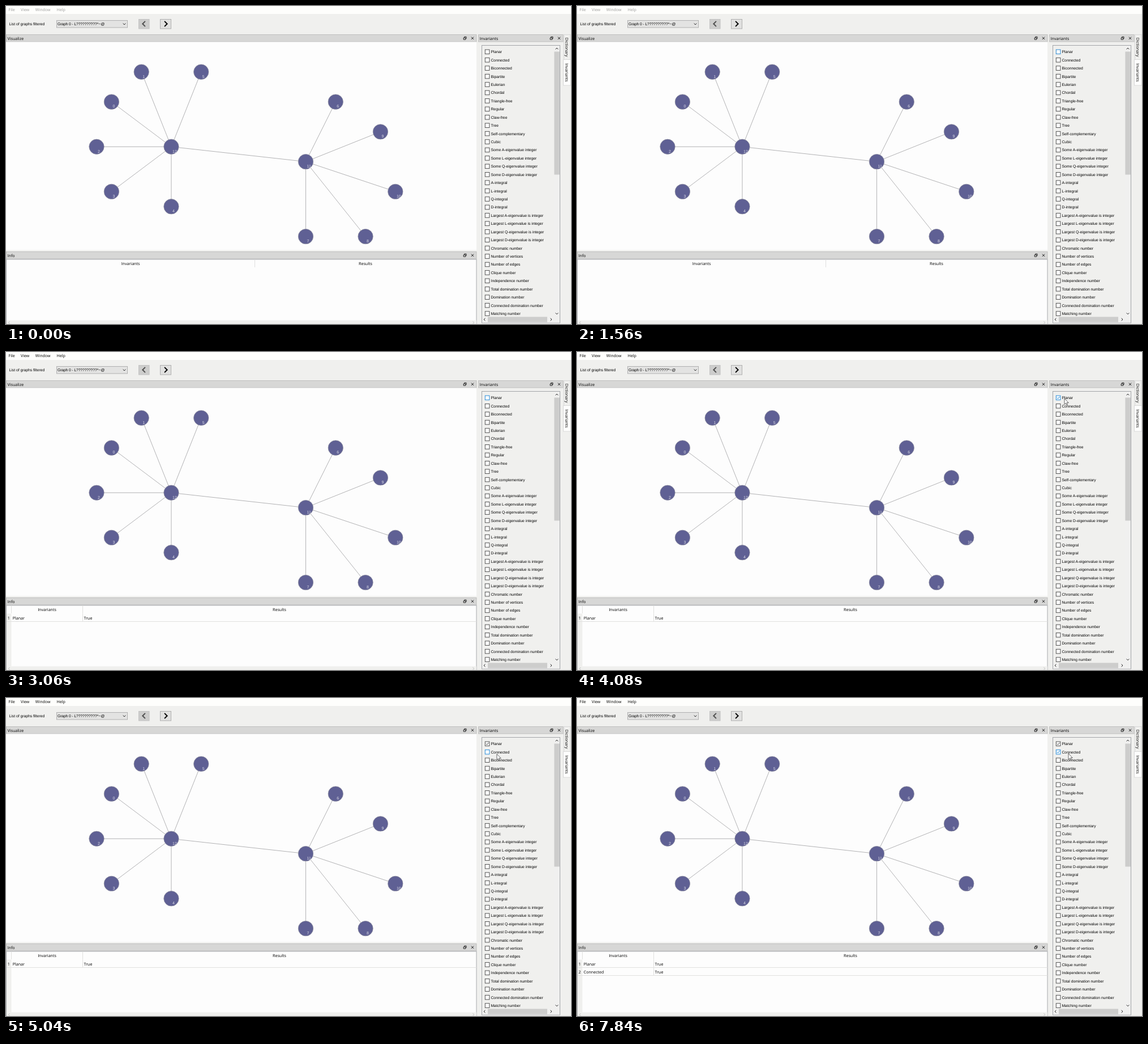
An HTML page that plays this animation: 998x561 px, repeating every 8 s.

```html
<!DOCTYPE html>
<html lang="en">
<head>
<meta charset="utf-8">
<title>Graph invariants</title>
<style>
html, body { margin: 0; width: 100%; height: 100%; overflow: hidden; background: #f0f0ee; }
svg { display: block; }
text { font: 7.1px "Open Sans", "Noto Sans", sans-serif; fill: #000; text-rendering: geometricPrecision; }
.form { font: 6.75px "Liberation Sans", Arial, sans-serif; }
.combo { letter-spacing: -.1px; }
.mid { text-anchor: middle; }
.node { fill: #5f6094; stroke: #8e8e9c; stroke-width: .7; }
.label { font: 7px "Liberation Sans", Arial, sans-serif; fill: #dcdce6; }
.edge { stroke: #b2b2b4; stroke-width: 1; }
.icon { fill: none; stroke: #222; stroke-width: 1; }
.pale { stroke: #bcbcbc; }
.grid { stroke: #e0e0df; }

.box { color: #444; }
.box rect { fill: #fdfdfd; stroke: currentColor; stroke-width: .9; }
.box path { fill: none; stroke: currentColor; stroke-width: 1; opacity: 0; }

/* one loop is 8 s, so 1% is 80 ms */
.menu, .before, .after, .second, .cursor, .box, .box path {
  animation: 8s linear infinite;
}
.menu { animation-name: enable; }
.before { animation-name: hide; }
.after { animation-name: show; }
.second { animation-name: showSecond; }
.cursor { animation-name: move, appear; }
.box0 { animation-name: hover0; }
.box1 { animation-name: hover1; }
.box2 { animation-name: hover2; }
.box0 path { animation-name: check0; }
.box1 path { animation-name: check1; }

@keyframes enable { 0%, 36.24% { fill: #9c9c9c; } 36.25%, 100% { fill: #000; } }
@keyframes hide { 0%, 36.24% { opacity: 1; } 36.25%, 100% { opacity: 0; } }
@keyframes show { 0%, 36.24% { opacity: 0; } 36.25%, 100% { opacity: 1; } }
@keyframes showSecond { 0%, 92.49% { opacity: 0; } 92.5%, 100% { opacity: 1; } }
@keyframes appear { 0%, 38.99% { opacity: 0; } 39%, 100% { opacity: 1; } }
@keyframes hover0 { 0%, 13.75% { color: #444; } 20%, 55% { color: #1583d8; } 62%, 100% { color: #444; } }
@keyframes hover1 {
  0%, 8.75% { color: #444; } 11.25%, 13.5% { color: #1583d8; }
  18.75%, 55% { color: #444; } 60%, 100% { color: #1583d8; }
}
@keyframes hover2 { 0%, 5.5% { color: #444; } 8%, 8.75% { color: #1583d8; } 12%, 100% { color: #444; } }
@keyframes check0 { 0%, 39% { opacity: 0; } 43.75%, 100% { opacity: 1; } }
@keyframes check1 { 0%, 93% { opacity: 0; } 98%, 100% { opacity: 1; } }
@keyframes move {
  0%, 52.5% { transform: translate(861px, 82px); }
  56.5% { transform: translate(873px, 96px); }
  61% { transform: translate(867px, 101px); }
  63%, 82.5% { transform: translate(867px, 98.7px); }
  84%, 86% { transform: translate(868px, 99.2px); }
  87.5%, 100% { transform: translate(868px, 98px); }
}
</style>
</head>
<body>
<svg id="stage" width="998" height="561" viewBox="0 0 998 561"></svg>
<script>
const rect = (x, y, w, h, fill, stroke) =>
  `<rect x="${x}" y="${y}" width="${w}" height="${h}" fill="${fill}"${stroke ? ` stroke="${stroke}"` : ''}/>`;
const text = (x, y, str, cls = '') => `<text x="${x}" y="${y}" class="${cls}">${str}</text>`;
const path = (d, cls = 'icon', extra = '') => `<path d="${d}" class="${cls}" ${extra}/>`;
const line = (x1, y1, x2, y2, cls) => `<line x1="${x1}" y1="${y1}" x2="${x2}" y2="${y2}" class="${cls}"/>`;
const group = (cls, ...parts) => `<g class="${cls}">${parts.join('')}</g>`;

// chevron pointing along (dx, dy)
const chevron = (x, y, dx, dy, r, cls, extra) => path(
  `M${x - dx * r / 2 - dy * r} ${y - dy * r / 2 - dx * r}L${x + dx * r / 2} ${y + dy * r / 2}` +
  `L${x - dx * r / 2 + dy * r} ${y - dy * r / 2 + dx * r}`, cls, extra);

function titleBar(x, y, w, name) {
  const fx = x + w - 21, cx = x + w - 7.5, cy = y + 6.8;
  return rect(x + .5, y + .5, w - 1, 12.5, '#d7d7d6', '#bfbfbe') + text(x + 2.6, y + 9.6, name) +
    path(`M${fx - 2.3} ${cy - .7}h3.6v3.1h-3.6zM${fx - .9} ${cy - .9}v-1.6h3.4v3.2h-1`, 'icon', 'stroke-width=".8"') +
    path(`M${cx - 2.2} ${cy - 2.2}l4.4 4.4m0 -4.4l-4.4 4.4`);
}

function toolbar() {
  const menus = [['File', 4.6], ['View', 26], ['Window', 51.8], ['Help', 89.6]];
  return rect(0, 0, 998, 14, '#fefefc') +
    menus.map(([name, x]) => text(x, 9.2, name, 'menu')).join('') +
    text(5.6, 34.2, 'List of graphs filtered', 'form') +
    rect(89.5, 25.5, 125, 12.5, '#e3e3e2', '#b0b0b0') +
    text(91, 34.2, 'Graph 0 - L??????????^~@', 'form combo') +
    chevron(209, 31.8, 0, 1, 2.3) +
    rect(234.5, 23.5, 18.5, 16.5, '#cdcdcc', '#c2c2c2') +
    chevron(243.6, 31.5, -1, 0, 4.6, 'icon', 'style="stroke:#505050;stroke-width:2"') +
    rect(272.5, 23.5, 19, 16.5, '#e1e1e0', '#b0b0b0') +
    chevron(282.3, 31.5, 1, 0, 4.6, 'icon', 'style="stroke:#080808;stroke-width:2"');
}

function graph() {
  const cells = [[1, 2], [3, 0], [0, 5], [1, 8], [5, 9], [7, 0], [16, 2],
    [14, 11], [18, 11], [19, 4], [20, 8], [14, 6], [5, 5]];
  const at = cells.map(([i, j]) => [160 + 26.39 * i, 116.3 + 26.39 * j]);
  const edge = (a, b) => line(...at[a], ...at[b], 'edge');
  let out = rect(0, 63.5, 831, 367, '#fdfdfd') + edge(11, 12);
  for (let i = 0; i < 11; i++) out += edge(i, i < 6 ? 12 : 11);
  at.forEach(([x, y], i) => {
    out += `<circle cx="${x}" cy="${y}" r="13.2" class="node"/>` + text(x + 2.1, y + 10.4, i, 'label');
  });
  return out;
}

function tableRow(n, name) {
  const y = 461.2 + 14.4 * (n - 1), bottom = Math.floor(y + 14.4) + .5;
  return text(4.9, y + 10.3, n, 'mid') + text(11.7, y + 10.3, name) + text(137.6, y + 10.3, 'True') +
    line(1, bottom, 831, bottom, 'grid') + line(135.5, y, 135.5, bottom, 'grid');
}

function table() {
  const heads = (a, b, split) => text(a, 457.4, 'Invariants', 'mid') + text(b, 457.4, 'Results', 'mid') +
    line(split, 447.5, split, 461, 'grid');
  return rect(.5, 447, 830.5, 116, '#fdfdfd', '#a6a8ac') +
    group('before', heads(220, 635, 439.5)) +
    group('after', rect(1, 461.5, 8.5, 93, '#f0f0ee'), heads(72.5, 483, 135.5),
      line(9.5, 447.5, 9.5, 461, 'grid'), tableRow(1, 'Planar')) +
    group('second', tableRow(2, 'Connected')) +
    rect(1, 554.5, 830, 6.5, '#f0f0ee') +
    chevron(5.5, 558.6, -1, 0, 2.3, 'icon pale') + chevron(825.6, 558.6, 1, 0, 2.3, 'icon pale');
}

function checklist() {
  const kinds = ['A', 'L', 'Q', 'D'];
  const names = ['Planar', 'Connected', 'Biconnected', 'Bipartite', 'Eulerian', 'Chordal',
    'Triangle-free', 'Regular', 'Claw-free', 'Tree', 'Self-complementary', 'Cubic',
    ...kinds.map(k => `Some ${k}-eigenvalue integer`),
    ...kinds.map(k => `${k}-integral`),
    ...kinds.map(k => `Largest ${k}-eigenvalue is integer`),
    'Chromatic number', 'Number of vertices', 'Number of edges', 'Clique number',
    'Independence number', 'Total domination number', 'Domination number',
    'Connected domination number', 'Matching number'];
  const rows = names.map((name, i) => {
    const y = 80.8 + 14.43 * i;
    return group(`box box${i}`, rect(846.3, y - 3.8, 7.6, 7.6, '#fdfdfd'),
      path(`M847.9 ${y}l1.6 1.8 3 -3.8`, '')) + text(856.5, y + 2.5, name, 'form');
  }).join('');
  return rect(840.5, 69.5, 138, 489.5, '#f0f0ee', '#a2a4a8') +
    `<clipPath id="list"><rect x="841" y="70" width="127" height="477.6"/></clipPath>` +
    `<g clip-path="url(#list)">${rows}</g>` +
    rect(968, 70, 10, 478, '#f0f0ef') + rect(968.4, 80.5, 9.4, 217, '#cdcdcc') +
    chevron(973, 75.2, 0, -1, 2.3) + chevron(973, 542.6, 0, 1, 2.3) +
    rect(841, 548, 137, 10.5, '#f0f0ef') + rect(851, 548.4, 105, 9.4, '#cdcdcc') +
    chevron(845.3, 553, -1, 0, 2.3) + chevron(962.8, 553, 1, 0, 2.3);
}

function tabs() {
  const label = (y, name) =>
    `<text transform="translate(988.2 ${y}) rotate(90)">${name}</text>`;
  return rect(985.5, 50.5, 11.5, 44, '#f0f0ee', '#d6d6d6') +
    rect(984.5, 94.5, 13, 45.5, '#fefefd', '#d9d9d9') +
    label(55.8, 'Dictionary') + label(101, 'Invariants');
}

document.getElementById('stage').innerHTML =
  rect(0, 0, 998, 561, '#f0f0ee') + toolbar() +
  titleBar(0, 50, 831.5, 'Visualize') + graph() +
  titleBar(0, 433, 831.5, 'Info') + table() +
  titleBar(834, 50, 150.5, 'Invariants') + checklist() + tabs() +
  group('cursor', path('M0 0V10.4L2.4 8.2 4 11.9 5.6 11.2 4 7.6H7.3Z', '',
    'fill="#fff" stroke="#333" stroke-width=".75"'));
</script>
</body>
</html>
```
